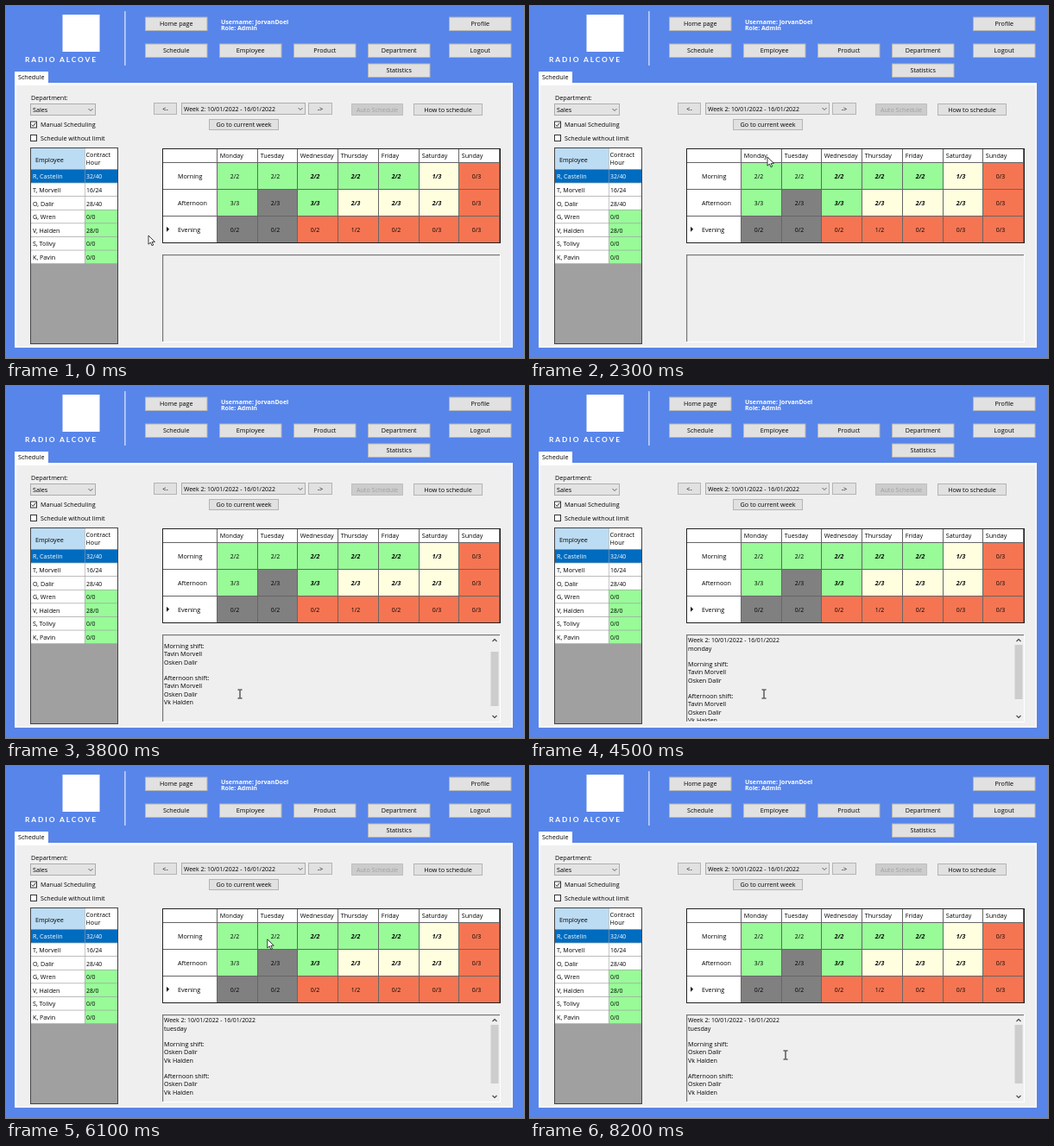
Recreate the animation shown at these times as an HTML page. Size 600 px wide and 408 px high, loop 8300 ms.

```html
<!DOCTYPE html>
<html lang="en">
<head>
<meta charset="utf-8">
<style>
html, body { margin: 0; width: 100%; height: 100%; overflow: hidden; background: #5885e9; }
svg { display: block; }
text { font: 7.2px "Open Sans", "Noto Sans", sans-serif; fill: #000; white-space: pre; }
.num { font-size: 6.9px; }
.strong { font-weight: 700; font-style: italic; }
.user { font-size: 7px; font-weight: 700; fill: #fff; }
.brand { font: 700 8.4px Lato, sans-serif; letter-spacing: 1.9px; fill: #fff; }
.mid { text-anchor: middle; }
.off { fill: #a0a0a0; }
.light { fill: #fff; }
</style>
</head>
<body>
<svg id="stage" width="600" height="408" viewBox="0 0 600 408"></svg>
<script>
const LOOP = 8300, STEP = 100, LINE = 9.25;
const GREEN = '#98fb98', GRAY = '#808080', CREAM = '#ffffe0', CORAL = '#f57552', SELECTED = '#006cc0';
const WEEK = 'Week 2: 10/01/2022 - 16/01/2022';

const rect = (x, y, w, h, fill) => `<rect x="${x}" y="${y}" width="${w}" height="${h}" fill="${fill}"/>`;
const box = (x, y, w, h, fill, edge) =>
  `<rect x="${x + .5}" y="${y + .5}" width="${w - 1}" height="${h - 1}" fill="${fill}" stroke="${edge}"/>`;
const label = (x, y, s, cls = '') => `<text x="${x}" y="${y}" class="${cls}">${s.replace(/</g, '&lt;')}</text>`;
const line = (d, color, width = 1) => `<path d="${d}" fill="none" stroke="${color}" stroke-width="${width}"/>`;
const button = (x, y, w, h, s) => box(x, y, w, h, '#e1e1e1', '#b4b4b4') + label(x + w / 2, y + h / 2 + 2.5, s, 'mid');
const combo = (x, y, w, s, cls) => box(x, y, w, 14, '#e3e3e3', '#adadad') + label(x + 3, y + 9.7, s, cls) +
  line(`M${x + w - 8.5} ${y + 6}l2.5 2.5 2.5-2.5`, '#555', .9);
const checkbox = (y, s, on) => box(28, y, 8, 8, '#fff', '#333') + label(40, y + 6.6, s) +
  (on ? line(`M29.8 ${y + 4}l1.6 1.8 3-3.8`, '#222', 1) : '');

function header() {
  return rect(65.5, 10, 43, 43, '#fff') + label(22, 64.5, 'RADIO ALCOVE', 'brand') +
    rect(137.3, 6, 1.2, 63, '#e4ebfc') +
    label(249, 20.5, 'Username: JorvanDoel', 'user') + label(249, 27.7, 'Role: Admin', 'user') +
    [[161, 13, 'Home page'], [513, 13, 'Profile'], [161, 44, 'Schedule'], [247, 44, 'Employee'],
     [333, 44, 'Product'], [419, 44, 'Department'], [513, 44, 'Logout'], [419, 67, 'Statistics']]
      .map(([x, y, s]) => button(x, y - .5, 72.5, 16.5, s)).join('');
}

function controls() {
  return rect(10, 89, 577, 307, '#f9f9f9') + rect(10, 76, 39, 16, '#fff') + rect(12.5, 92, 573, 302.5, '#f0eff0') +
    label(14, 85, 'Schedule') + label(29, 108.5, 'Department:') + combo(28, 113, 76, 'Sales') +
    checkbox(133.5, 'Manual Scheduling', true) + checkbox(149, 'Schedule without limit', false) +
    button(171, 112, 27, 14, '<-') + combo(203, 112, 144, WEEK, 'num') + button(350, 112, 28, 14, '->') +
    button(235, 131, 81, 13, 'Go to current week') + button(472, 113, 80, 14, 'How to schedule') +
    box(400, 113, 60, 14, '#cccccc', '#bfbfbf') + label(430, 122.5, 'Auto Schedule', 'mid off');
}

function employees() {
  const rows = [['R, Castelin', '32/40'], ['T, Morvell', '16/24'], ['O, Dalir', '28/40'], ['G, Wren', '0/0'],
    ['V, Halden', '28/0'], ['S, Tolivy', '0/0'], ['K, Pavin', '0/0']];
  let out = box(28, 164, 102, 228, '#a0a0a0', '#444') + rect(29, 165, 62, 24, '#bcdcf4') +
    rect(91.6, 165, 37.4, 24, '#fff') + label(34, 181, 'Employee') +
    label(92.5, 174.6, 'Contract') + label(92.5, 184.2, 'Hour');
  rows.forEach(([name, hours], i) => {
    const y = 189.8 + i * 15.6, cls = i ? '' : 'light';
    out += rect(29, y, 62, 14.9, i ? '#fff' : SELECTED) +
      rect(91.6, y, 37.4, 14.9, i > 2 ? GREEN : i ? '#fff' : SELECTED) +
      label(31, y + 10.6, name, cls) + label(93, y + 10.6, hours, 'num ' + cls);
  });
  return out;
}

function schedule() {
  const days = ['Monday', 'Tuesday', 'Wednesday', 'Thursday', 'Friday', 'Saturday', 'Sunday'];
  const colors = { g: GREEN, k: GRAY, y: CREAM, r: CORAL };
  const shifts = [['Morning', '2/2 2/2 2/2 2/2 2/2 1/3 0/3', 'gggggyr'],
    ['Afternoon', '3/3 2/3 3/3 2/3 2/3 2/3 0/3', 'gkgyyyr'],
    ['Evening', '0/2 0/2 0/2 1/2 0/2 0/3 0/3', 'kkrrrrr']];
  const col = i => Math.floor(245.5 + i * 46.7);
  const width = i => col(i + 1) - col(i) - 1;
  let out = box(181, 165, 392, 110, '#666', '#222') + rect(182, 166, 62, 15, '#fff');
  days.forEach((day, i) => out += rect(col(i), 166, width(i), 15, '#fff') + label(col(i) + 2.7, 176, day));
  shifts.forEach(([name, counts, fills], r) => {
    const y = 182 + r * 31;
    out += rect(182, y, 62, 30, '#fff') + label(199, y + 18, name);
    counts.split(' ').forEach((s, i) => {
      const strong = r < 2 && i > 1 && i < 6;
      out += rect(col(i), y, width(i), 30, colors[fills[i]]) +
        label(col(i) + 20, y + 17.5, s, 'mid num' + (strong ? ' strong' : ''));
    });
  });
  return out + '<path d="M186 255.7l3.2 3-3.2 3z" fill="#222"/>';
}

const details = rect(181, 288, 392, 102, '#fff') + rect(181, 288, 391, 101, '#777') + rect(182.2, 289.2, 389.8, 99.8, '#f0eff0') +
  '<svg x="182" y="290" width="380" height="98.5"><g id="notes"></g></svg><g id="bar">' +
  line('M563.5 296l2.5-2.5 2.5 2.5M563.5 382l2.5 2.5 2.5-2.5', '#444', 1.1) +
  '<rect id="thumb" x="561.5" width="9" fill="#cdcdcd"/></g>';

const cursors = '<path id="arrow" d="M0 0V10.2L2.4 8 4 11.7 5.7 11 4.1 7.4H7.4Z" fill="#fff" stroke="#111" stroke-width=".8"/>' +
  '<path id="beam" d="M-2.5-5H-.6L0-4.5.6-5H2.5M0-4.5V4.5M-2.5 5H-.6L0 4.5.6 5H2.5" fill="none" stroke="#111"/>';

const $ = id => document.getElementById(id);
$('stage').innerHTML = rect(0, 0, 600, 408, '#5885e9') + header() + controls() + employees() + schedule() + details + cursors;

const notes = {
  monday: ['Morning shift:', 'Tavin Morvell', 'Osken Dalir', '', 'Afternoon shift:', 'Tavin Morvell', 'Osken Dalir', 'Vk Halden'],
  tuesday: ['Morning shift:', 'Osken Dalir', 'Vk Halden', '', 'Afternoon shift:', 'Osken Dalir', 'Vk Halden', '', 'Evening shift:']
};
// [time, day, scroll offset, thumb top, thumb height]
const views = [[0, '', 0, 0, 0], [2700, 'monday', 0, 300, 63], [3700, 'monday', 21, 308, 63], [4300, 'monday', 0, 300, 63],
  [5800, 'tuesday', 0, 300, 68], [6700, 'tuesday', 12.5, 309, 63], [7500, 'tuesday', 0, 300, 68]];
// [time, x, y] of the pointer
const path = [[0, 165, 266], [200, 165, 266], [1000, 172, 144], [1300, 172, 144], [2200, 275, 175], [2800, 275, 175],
  [3600, 271, 357], [4600, 271, 357], [5200, 289, 288], [5600, 304, 175], [5900, 304, 175], [6700, 296, 340],
  [7500, 296, 340], [7800, 296, 335], [LOOP, 296, 335]];

function pointer(t) {
  const i = path.findIndex(p => p[0] > t), [t0, x0, y0] = path[i - 1], [t1, x1, y1] = path[i];
  const u = (t - t0) / (t1 - t0), e = u * u * (3 - 2 * u);
  return [x0 + (x1 - x0) * e, y0 + (y1 - y0) * e];
}

let shownDay = null;
function draw(now) {
  const t = Math.floor(now % LOOP / STEP) * STEP;
  const [, day, scroll, top, height] = views.findLast(v => v[0] <= t);
  if (day !== shownDay) {
    const lines = day ? [WEEK, day, '', ...notes[day]] : [];
    $('notes').innerHTML = lines.map((s, i) => label(1, 7.3 + i * LINE, s, i ? '' : 'num')).join('');
    shownDay = day;
  }
  $('notes').setAttribute('transform', `translate(0 ${-scroll})`);
  $('bar').style.display = day ? '' : 'none';
  $('thumb').setAttribute('y', top);
  $('thumb').setAttribute('height', height);

  const [x, y] = pointer(t), overNotes = y > 289;
  for (const id of ['arrow', 'beam']) {
    $(id).setAttribute('transform', `translate(${x} ${y})`);
    $(id).style.display = (id === 'beam') === overNotes ? '' : 'none';
  }
  requestAnimationFrame(() => draw(performance.now() - start));
}
const start = performance.now();
draw(0);
</script>
</body>
</html>
```
